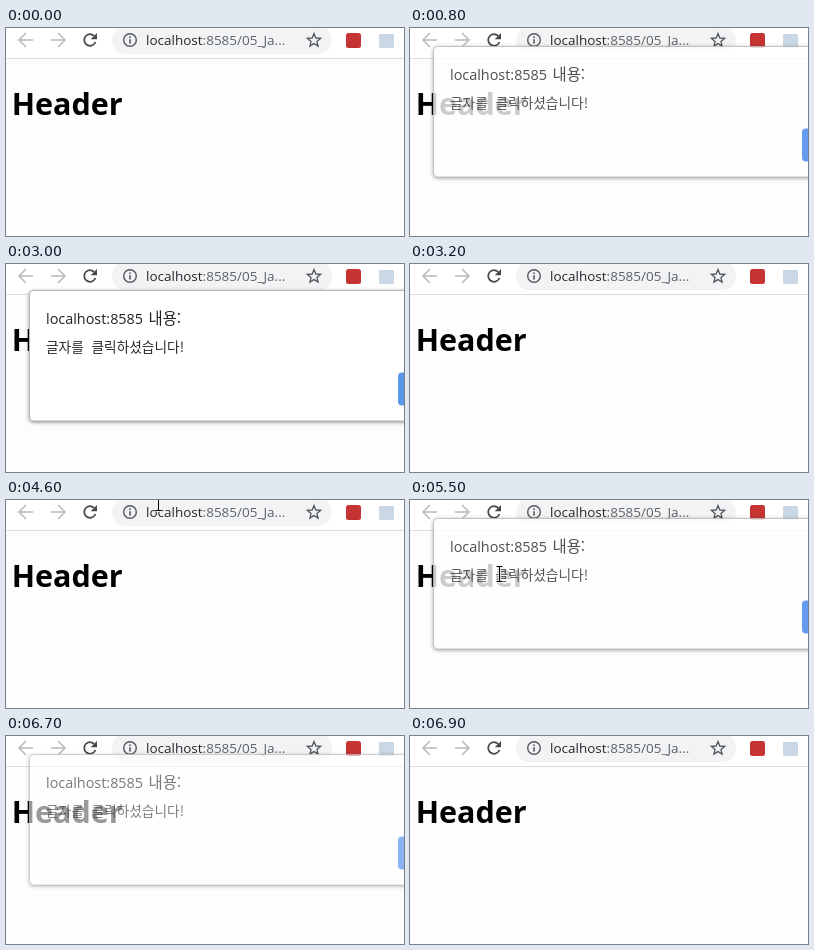
Write an HTML page with a canvas that moves like this. It is 398 px wide and 208 px high and loops after 7.6 s.

```html
<!DOCTYPE html>
<html lang="ko">
<head>
<meta charset="utf-8">
<title>Header</title>
<style>
html, body { margin: 0; width: 100%; height: 100%; overflow: hidden; background: #fdfdfd; }
canvas { display: block; }
</style>
</head>
<body>
<canvas id="stage" width="398" height="208"></canvas>
<script>
const ctx = document.getElementById('stage').getContext('2d');
const LOOP = 7600;
const STEP = 100;
const LATIN = '"Open Sans", "Noto Sans", sans-serif';
const HANGUL = '"Noto Sans CJK KR", "Noto Sans CJK", sans-serif';

function text(str, x, y, font, color) {
  ctx.font = font;
  ctx.fillStyle = color;
  ctx.fillText(str, x, y);
}

function box(x, y, w, h, r, color) {
  ctx.beginPath();
  ctx.roundRect(x, y, w, h, r);
  ctx.fillStyle = color;
  ctx.fill();
}

function line(points, color, width, close) {
  ctx.beginPath();
  points.forEach(([x, y]) => ctx.lineTo(x, y));
  if (close) ctx.closePath();
  ctx.strokeStyle = color;
  ctx.lineWidth = width;
  ctx.stroke();
}

function navArrow(x, dir) {
  const tip = x + 7 * dir;
  line([[x - 7 * dir, 12], [tip, 12]], '#b9bbbe', 1.6);
  line([[x, 5], [tip, 12], [x, 19]], '#b9bbbe', 1.6);
}

function reloadIcon() {
  ctx.beginPath();
  ctx.arc(84, 12, 5.8, 0.35, Math.PI * 1.75);
  ctx.strokeStyle = '#45484c';
  ctx.lineWidth = 1.8;
  ctx.stroke();
  ctx.beginPath();
  ctx.moveTo(91, 5);
  ctx.lineTo(91, 11.3);
  ctx.lineTo(84.7, 11.3);
  ctx.fillStyle = '#45484c';
  ctx.fill();
}

function infoIcon() {
  ctx.beginPath();
  ctx.arc(124, 12, 6.3, 0, Math.PI * 2);
  ctx.strokeStyle = '#55585c';
  ctx.lineWidth = 1.4;
  ctx.stroke();
  ctx.fillStyle = '#55585c';
  ctx.fillRect(123.2, 8.4, 1.6, 1.6);
  ctx.fillRect(123.2, 11.2, 1.6, 4.4);
}

function star(x, y, r) {
  const pts = [];
  for (let i = 0; i < 10; i++) {
    const a = -Math.PI / 2 + i * Math.PI / 5;
    const d = i % 2 ? r * 0.44 : r;
    pts.push([x + d * Math.cos(a), y + d * Math.sin(a)]);
  }
  line(pts, '#55585c', 1.3, true);
}

function page() {
  ctx.fillStyle = '#fdfdfd';
  ctx.fillRect(0, 0, 398, 208);
  ctx.fillStyle = '#fff';
  ctx.fillRect(0, 0, 398, 30);
  navArrow(20, -1);
  navArrow(52, 1);
  reloadIcon();
  box(106, -2, 220, 28, 14, '#f1f3f4');
  infoIcon();
  const font = '13.5px ' + LATIN;
  text('localhost', 140, 17, font, '#26282b');
  text(':8585/05_Ja...', 140 + ctx.measureText('localhost').width, 17, font, '#5f6368');
  star(308, 12.5, 7);
  box(340, 5, 15, 15, 2.5, '#c53433');
  box(373, 6, 15, 14, 1, '#c9d8e4');
  ctx.fillStyle = '#dcdcdc';
  ctx.fillRect(0, 30, 398, 1);
  text('Header', 5.7, 87, 'bold 30.5px ' + LATIN, '#000');
}

// Casts a shadow only outside the panel, so a fading panel stays white
function panel(x, y, w, h, r) {
  ctx.save();
  ctx.beginPath();
  ctx.rect(0, -20, 398, 260);
  ctx.roundRect(x, y, w, h, r);
  ctx.clip('evenodd');
  ctx.shadowColor = 'rgba(0,0,0,0.5)';
  ctx.shadowBlur = 4;
  ctx.shadowOffsetY = 1;
  box(x, y, w, h, r, '#fff');
  ctx.restore();
  box(x, y, w, h, r, '#fff');
  ctx.strokeStyle = '#b4b4b4';
  ctx.lineWidth = 1;
  ctx.stroke();
}

function dialog({ alpha, dy, pressed }) {
  ctx.save();
  ctx.globalAlpha = alpha;
  ctx.translate(0, dy);
  panel(23.5, 26.5, 400, 130.5, 4);
  text('localhost:8585', 40, 60, '14.4px ' + LATIN, '#222');
  text('내용:', 142.5, 60, '15.4px ' + HANGUL, '#222');
  const font = '13.7px ' + HANGUL;
  text('글자를', 40, 88, font, '#2a2a2a');
  text('클릭하셨습니다!', 85.5, 88, font, '#2a2a2a');
  box(392, 108.5, 60, 33, 4, pressed ? '#5b97e8' : '#3f83ee');
  ctx.restore();
}

function beam(x, y) {
  const draw = (color, w) => {
    line([[x + 0.5, y - 7], [x + 0.5, y + 7]], color, w);
    for (const s of [-1, 1]) {
      line([[x - 2.5, y + 7.5 * s], [x + 3.5, y + 7.5 * s]], color, w);
    }
  };
  draw('#fff', 2.6);
  draw('#000', 1.1);
}

function arrow(x, y) {
  const shape = [[0, 0], [0, 16.5], [3.8, 13], [6.4, 19], [9, 17.9], [6.4, 12], [11.5, 11.6]];
  const pts = shape.map(([a, b]) => [x + 0.5 + a, y + 0.5 + b]);
  line(pts, '#111', 1.1, true);
  ctx.fillStyle = '#fff';
  ctx.fill();
  ctx.stroke();
}

// Dialog states: [from ms, alpha, vertical offset, button pressed]
const STATES = [
  [0, 0, 0], [800, 0.8, -8], [900, 1, 0], [3000, 1, 0, true],
  [3100, 0.5, -8], [3200, 0, 0], [5500, 0.8, -8], [5600, 1, 0],
  [6600, 1, 0, true], [6700, 0.6, -8], [6800, 0.2, -16], [6900, 0, 0]
];

function dialogAt(t) {
  const [, alpha, dy, pressed] = STATES.filter(s => s[0] <= t).pop();
  return { alpha, dy, pressed };
}

// Pointer sweep to the button, one place per step
const SWEEP = [[150, 76], [254, 84], [316, 101], [376, 107], [391, 114]];

function pointer(t) {
  if (t < 4600 || t >= 6400) return;
  if (t < 5900) {
    const p = Math.min(1, (t - 4600) / 500);
    const e = 1 - (1 - p) ** 2;
    beam(Math.round(152 - 63 * e), Math.round(3 + 71 * e));
    return;
  }
  const i = (t - 5900) / STEP;
  (i < 2 ? beam : arrow)(...SWEEP[i]);
}

let start;
function frame(now) {
  start ??= now;
  const t = Math.floor(((now - start) % LOOP) / STEP) * STEP;
  page();
  const state = dialogAt(t);
  if (state.alpha) dialog(state);
  pointer(t);
  requestAnimationFrame(frame);
}
requestAnimationFrame(frame);
</script>
</body>
</html>
```
